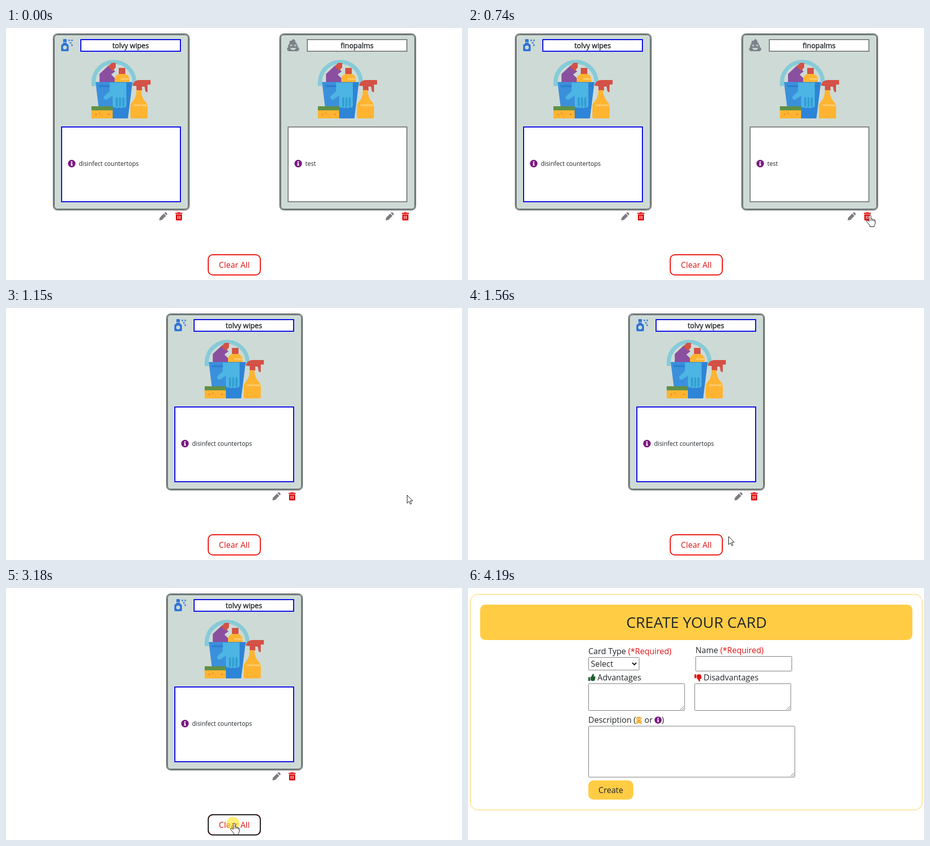
Animation of 902 by 499 pixels, one loop 4.88 s. Source, as an HTML page:

```html
<!DOCTYPE html>
<html lang="en">
<head>
<meta charset="utf-8">
<title>Cleaning cards</title>
<style>
html, body { margin: 0; width: 100%; height: 100%; overflow: hidden; background: #fff; }
svg { display: block; }
text { font: 16px "Open Sans", sans-serif; fill: #212529; white-space: pre; }
.mid { text-anchor: middle; }
.title { font-size: 14px; stroke: #212529; stroke-width: .4px; }
.note { font-size: 12px; }
.red { fill: #e01212; }
.panel { fill: #cedad5; stroke: #212529; }
.box { fill: #fff; stroke: var(--edge); stroke-width: 2; }
.field { fill: #fff; stroke: #767676; }
.gold { fill: #ffcc44; }
.grip { fill: none; stroke: #666; }
.glow { fill: #ffe620; opacity: .6; }

/* One loop of 4880 ms; every change is a hard cut. */
.anim { animation: 4880ms step-end infinite; }
.board { animation-name: board; }
.first { animation-name: recentre; }
.second { animation-name: second; }
.form { animation-name: form; }
.press1 { animation-name: press1; }
.press2 { animation-name: press2; }
.pointer { animation-name: travel; }
.arrow { animation-name: arrow; }
.hand { animation-name: hand; }
@keyframes board { 0% { opacity: 1 } 66.58%, 100% { opacity: 0 } }
@keyframes form { 0% { opacity: 0 } 66.58%, 100% { opacity: 1 } }
@keyframes recentre { 0% { transform: none } 23.56%, 100% { transform: translateX(224px) } }
@keyframes second { 0% { opacity: 1 } 23.56%, 100% { opacity: 0 } }
@keyframes press1 { 0% { opacity: 0 } 19.46% { opacity: 1 } 23.56%, 100% { opacity: 0 } }
@keyframes press2 { 0% { opacity: 0 } 65.15% { opacity: 1 } 66.58%, 100% { opacity: 0 } }
@keyframes arrow {
  0% { opacity: 0 } 6.96% { opacity: 1 } 12.49% { opacity: 0 } 23.56% { opacity: 1 }
  33.39% { opacity: 0 } 66.58% { opacity: 1 } 84.41%, 100% { opacity: 0 }
}
@keyframes hand {
  0% { opacity: 0 } 12.49% { opacity: 1 } 23.56% { opacity: 0 }
  33.39% { opacity: 1 } 66.58%, 100% { opacity: 0 }
}
@keyframes travel {
  0% { transform: translate(817px, 470px) }
  8.19% { transform: translate(802px, 440px) }
  9.62% { transform: translate(789px, 413px) }
  11.06% { transform: translate(788px, 393px) }
  12.49% { transform: translate(790px, 380px) }
  13.72% { transform: translate(792px, 373px) }
  15.15% { transform: translate(793px, 370px) }
  27.86% { transform: translate(768px, 376px) }
  29.3% { transform: translate(690px, 398px) }
  30.73% { transform: translate(590px, 430px) }
  31.96% { transform: translate(515px, 452px) }
  33.39% { transform: translate(474px, 462px) }
  34.83% { transform: translate(456px, 466px) }
  38.92% { transform: translate(452px, 466px) }
  40.36%, 100% { transform: translate(449px, 465px) }
}
</style>
</head>
<body>
<svg width="902" height="499" viewBox="0 0 902 499">
  <defs>
    <g id="info">
      <circle r="7.5" fill="#7b1a80"/>
      <path fill="#fff" d="M-1.3-4.4h2.5v2.4h-2.5zM-2-1.1H1.2V2.6H2V4H-2V2.6h.8V.3H-2z"/>
    </g>

    <g id="spray" fill="#2f74d8">
      <path d="M114 22h5q1 0 1 1v5h-7v-5q0-1 1-1zM113 29h7v2q4 1 4 5v8q0 2-2 2h-11q-2 0-2-2v-8q0-4 4-5z"/>
      <circle cx="116.5" cy="38.5" r="3.8" fill="#cedad5"/>
      <path id="spark" d="M125 22l.8 1.7 1.7.8-1.7.8-.8 1.7-.8-1.7-1.7-.8 1.7-.8z"/>
      <use href="#spark" x="5.5"/>
      <use href="#spark" x="3" y="5"/>
      <use href="#spark" x="5.5" y="9.5"/>
    </g>

    <g id="swirl" fill="#7b828a">
      <path d="M119 22c5 0 7 5 4 8h-9c-3-3 0-5 3-5q2-1 2-3z"/>
      <rect x="112" y="28" width="15" height="8" rx="4"/>
      <rect x="110" y="32" width="19" height="8" rx="4"/>
      <rect x="109" y="37.5" width="24" height="8.5" rx="4.2" transform="translate(-1)"/>
      <g fill="#cedad5">
        <circle cx="116" cy="34.5" r="2.1"/>
        <circle cx="124" cy="34.5" r="2.1"/>
        <path d="M114 39.5h12q-2 4-6 4t-6-4z"/>
      </g>
      <circle cx="116" cy="34.5" r=".9"/>
      <circle cx="124" cy="34.5" r=".9"/>
    </g>

    <g id="supplies">
      <path fill="none" stroke="#87cbd8" stroke-width="8" d="M173 115v-7.500a40.500 40.500 0 0 1 81 0v7"/>
      <path fill="#8a509f" d="M185 108V91l18-17 13 12-8 6 9 9v7z"/>
      <path fill="#d45146" d="M202 76l7-7h8v9l-6 7zM223 79h13v12h-13z"/>
      <path fill="#ffb431" d="M223 91h13q8 4 8 10v7h-29v-7q0-6 8-10z"/>
      <path fill="#ffc861" d="M228 99h14q2 2 2 4h-16q-2-2 0-4z"/>
      <path fill="#3b90dc" d="M177 107h73l-9 72h-55z"/>
      <path fill="#2e84d6" d="M211 107h39l-9 72h-30z"/>
      <path fill="#2c7fce" d="M183 113h62l-.5 4h-61.500z"/>
      <path fill="#4cb5e3" d="M205 108h33v46q-2 5-6.500 3-3.500 3-7 0-3.500 3-7 0-6 2-6.500-4v-19l-12 8q-3 1-5.500-3-.5-2 1-4l10.500-10z"/>
      <path stroke="#309dd4" stroke-width="4" stroke-linecap="round" d="M219 139v15m6.500-15v15m6.500-15v15"/>
      <path fill="#5f9147" d="M169 155h42v8h-42z"/>
      <path fill="#ffb431" d="M169 163h42v16h-42z"/>
      <g fill="#e8942e">
        <circle cx="178" cy="171" r="2"/>
        <circle cx="185" cy="169" r="1.800"/>
        <circle cx="203" cy="171" r="2"/>
        <circle cx="189" cy="173" r="1"/>
      </g>
      <path fill="#d45146" d="M250 114q3-11 14-11h22v9h-6v15q-5 0-5-6l-1-5h-5v8h-11v-9z"/>
      <path fill="#ffb431" d="M258 123h9q1 14 8 22 5 5 5 11v20q0 3-3 3h-28q-3 0-3-3v-20q0-6 5-11 7-8 7-22z"/>
      <path fill="#ffc861" d="M254 151h24.500l1 4H254q-3-2 0-4z"/>
    </g>

    <path id="pencil" fill="#7d7a80" d="M303 381l1-5.500 8-8 4.500 4.500-8 8zM313 366.500l1-1q1.500-1 3 0l1.500 1.500q1 1.500 0 3l-1 1z"/>
    <g id="bin" fill="#e00505">
      <path d="M335 366h4l1-1h4l1 1h4v2h-14zM336 369h12v10.500q0 1.500-1.500 1.500h-9q-1.500 0-1.500-1.500z"/>
      <path stroke="#fff" stroke-width="1" d="M339.500 371.500v7m2.500-7v7m2.500-7v7"/>
    </g>

    <g id="frame">
      <rect class="panel" x="93.500" y="11.500" width="269" height="349" rx="8"/>
      <rect class="panel" x="95.500" y="13.500" width="265" height="345" rx="6"/>
      <rect class="box" x="148" y="23" width="197" height="23"/>
      <rect class="box" x="110" y="196" width="235" height="148"/>
      <use href="#supplies"/>
      <use href="#info" x="130" y="268.500"/>
      <use href="#pencil"/>
    </g>

    <path id="thumb" d="M0 6.500h3.500V14H0zM4.500 7L8 2q0-2 1.500-2 2 0 1.800 2.500L10.500 5H13q1.300.5 1 2l-1 5q-.5 2-2.500 2H7l-2.500-1.500z"/>
    <path id="grip" class="grip" d="M-9-2l7-7M-5-2l3-3"/>
  </defs>

  <g class="anim board">
    <g class="anim first" style="--edge:#0000e8">
      <use href="#frame"/>
      <use href="#spray"/>
      <use href="#bin"/>
      <text class="title mid" x="246.500" y="40">tolvy wipes</text>
      <text class="note" x="144" y="273">disinfect countertops</text>
    </g>

    <g class="anim second">
      <g transform="translate(448)" style="--edge:#808080">
        <use href="#frame"/>
        <use href="#swirl"/>
        <text class="title mid" x="246.500" y="40">finopalms</text>
        <text class="note" x="144" y="273">test</text>
        <rect class="anim press1" x="327" y="361" width="30" height="24" rx="11" fill="#f6b954" stroke="#111" stroke-width="2"/>
        <use href="#bin"/>
      </g>
    </g>
    <g class="anim press1"><circle class="glow" cx="791" cy="372" r="13"/></g>

    <rect x="400" y="449" width="103" height="40" rx="9" fill="#fff" stroke="#f00a0a" stroke-width="2"/>
    <rect class="anim press2" x="400" y="449" width="103" height="40" rx="9" fill="none" stroke="#111" stroke-width="2"/>
    <text class="red mid" x="451.500" y="475">Clear All</text>
    <g class="anim press2"><circle class="glow" cx="449" cy="466" r="13"/></g>
  </g>

  <g class="anim form">
    <rect x="4.500" y="12.500" width="894" height="427" rx="15" fill="#fff" stroke="#ffcc44"/>
    <rect class="gold" x="24" y="33" width="855" height="70" rx="10"/>
    <text class="mid" x="452" y="79" style="font-size:30px">CREATE YOUR CARD</text>

    <text x="238" y="131">Card Type <tspan class="red">(*Required)</tspan></text>
    <rect class="field" x="238.500" y="137.500" width="100" height="25" rx="1"/>
    <text x="243" y="156">Select</text>
    <path d="M325 148l4 4 4-4" fill="none" stroke="#111" stroke-width="2"/>

    <text x="450" y="129">Name <tspan class="red">(*Required)</tspan></text>
    <rect class="field" x="450.500" y="135.500" width="190" height="29" rx="1"/>

    <use href="#thumb" x="238" y="170" fill="#1c5f30"/>
    <text x="256" y="183">Advantages</text>
    <rect class="field" x="238.500" y="189.500" width="190" height="53" rx="1"/>
    <use href="#grip" x="429" y="243"/>

    <use href="#thumb" fill="#e01212" transform="translate(448 185) scale(1 -1)"/>
    <text x="466" y="183">Disadvantages</text>
    <rect class="field" x="448.500" y="189.500" width="190" height="53" rx="1"/>
    <use href="#grip" x="639" y="243"/>

    <text x="238" y="267">Description (</text>
    <g fill="#f5a623">
      <path d="M338 255q5 0 5 4 0 2-2 3v2h-6v-2q-2-1-2-3 0-4 5-4z"/>
      <path d="M333 264l10 4m0-4l-10 4" stroke="#f5a623" stroke-width="2" stroke-linecap="round"/>
      <circle cx="336" cy="259.500" r="1.200" fill="#fff"/>
      <circle cx="340" cy="259.500" r="1.200" fill="#fff"/>
    </g>
    <text x="349" y="267">or</text>
    <use href="#info" transform="translate(376 261.500) scale(.95)"/>
    <text x="383" y="267">)</text>
    <rect class="field" x="238.500" y="273.500" width="408" height="101" rx="1"/>
    <use href="#grip" x="647" y="375"/>

    <rect class="gold" x="238" y="381" width="89" height="38" rx="10"/>
    <text class="mid" x="282.500" y="406">Create</text>
  </g>

  <g class="anim pointer" fill="#fff" stroke="#111" stroke-linejoin="round">
    <path class="anim arrow" d="M.5.5v16l3.700-3.500 2.600 5.500 2.300-1-2.500-5.500h5z"/>
    <g class="anim hand">
      <path d="M.5 13V2.500q0-2 1.700-2t1.800 2V8q2-1 3.300 1 2-1 3 1 2.200-.5 2.200 2v4q0 3-2 5v2.500H2V21l-6-7q-1.500-2 0-3 1.500-.5 2.500.5z"/>
      <path fill="none" d="M4 8v4m3.300-3v3m3-2v3"/>
    </g>
  </g>
</svg>
</body>
</html>
```
